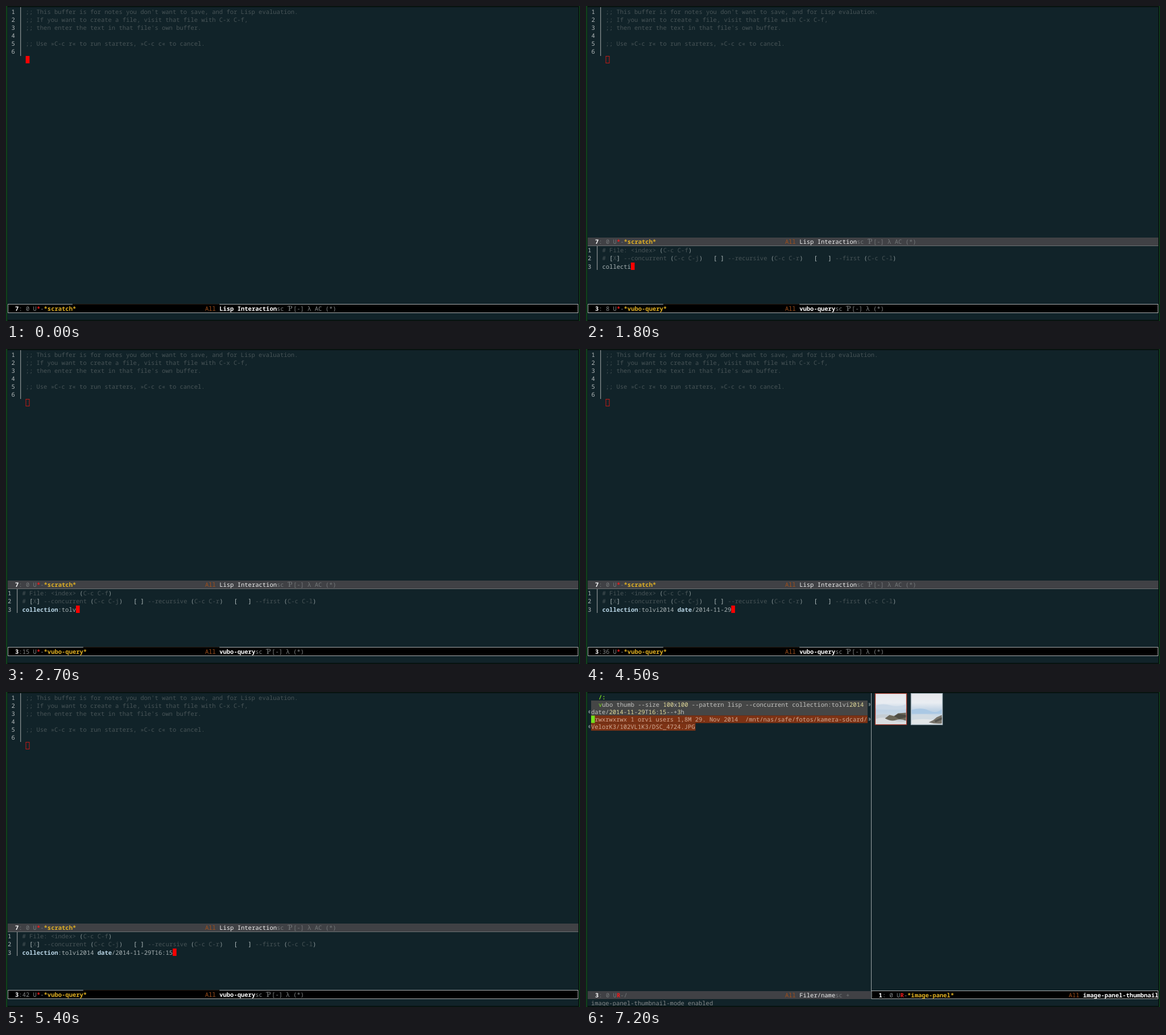
Recreate the animation shown at these times as an HTML page. Size 1009x555 px, loop 8000 ms.

```html
<!DOCTYPE html>
<html lang="en">
<head>
<meta charset="utf-8">
<title>Photo query in a text editor</title>
<style>
  html, body { margin: 0; width: 100%; height: 100%; overflow: hidden; background: #112329; }
  svg { display: block; width: 100vw; height: 100vh; }
  text {
    font: 10.5px "Noto Sans Mono", "DejaVu Sans Mono", monospace;
    white-space: pre; text-rendering: geometricPrecision; fill: #a9b3b5;
  }
  .dim { fill: #485457; }
  .num { fill: #b4babb; }
  .paren { fill: #8b9799; }
  .bracket { fill: #b9c3c4; }
  .grey { fill: #85898a; }
  .soft { fill: #737779; }
  .white { fill: #f0f0f0; }
  .strong { fill: #fff; font-weight: 700; }
  .gold { fill: #e2b122; font-weight: 700; }
  .red { fill: #f01c1c; font-weight: 700; }
  .brown { fill: #a0501c; }
  .key { fill: #b9d6e6; font-weight: 700; }
  .green { fill: #7ee020; font-weight: 700; }
  .lime { fill: #7ee020; }
  .yellow { fill: #e3dc9c; }
  .pale { fill: #c3c3c0; }
  .rust { fill: #d0aa94; }
  .serif { font-family: "Noto Serif", "DejaVu Sans", serif; font-size: 12.5px; }
</style>
</head>
<body>
<svg id="stage" viewBox="0 0 1009 555" preserveAspectRatio="none">
  <defs>
    <linearGradient id="fade">
      <stop offset="0" stop-color="#858789"/>
      <stop offset=".5" stop-color="#62696c"/>
      <stop offset=".85" stop-color="#344147"/>
      <stop offset="1" stop-color="#112329"/>
    </linearGradient>
    <linearGradient id="sky" x2="0" y2="1">
      <stop offset="0" stop-color="#e6e8ec"/>
      <stop offset=".3" stop-color="#e9edf2"/>
      <stop offset=".55" stop-color="#bfd2e4"/>
      <stop offset="1" stop-color="#dce3e8"/>
    </linearGradient>
  </defs>
</svg>
<script>
const LOOP = 8000, STEP = 900, CHAR = 6.3;
const QUERY = "collection:tolvi2014 date/2014-11-29T16:15--+3h";
const TYPED = [0, 0, 8, 15, 26, 36, 42, 47];
const stage = document.getElementById("stage");

function add(parent, tag, attrs = {}) {
  const node = document.createElementNS("http://www.w3.org/2000/svg", tag);
  for (const name in attrs) node.setAttribute(name, attrs[name]);
  parent.append(node);
  return node;
}

const group = () => add(stage, "g");

function rect(parent, x, y, width, height, fill, extra = {}) {
  return add(parent, "rect", { x, y, width, height, fill, ...extra });
}

function setRuns(node, runs) {
  node.replaceChildren();
  for (const [words, style] of runs) {
    add(node, "tspan", style ? { class: style } : {}).textContent = words;
  }
}

// y is the baseline; runs are [words, class] pairs
function text(parent, x, y, ...runs) {
  const node = add(parent, "text", { x, y });
  setRuns(node, runs);
  return node;
}

// Splits a line so that digits get their own class
function digits(words, base) {
  return words.split(/(\d+)/).filter(Boolean)
    .map(part => [part, /\d/.test(part) ? "yellow" : base]);
}

function modeLine(parent, o) {
  const { x, y, width, height, active, base } = o;
  const tone = active ? "grey" : "soft";
  const at = col => x + .5 + col * CHAR;
  if (active) {
    rect(parent, x + .5, y + .5, width - 1, height - 1, "#000", { stroke: "#a9adad" });
  } else {
    rect(parent, x, y, width, height, "#404145");
    rect(parent, x, y + height - 1, width, 1, o.edge || "#404145");
  }
  // The upper border is missing between the name and the mode
  if (o.gap) {
    const start = at(9 + o.name.length);
    rect(parent, start, y, at(59) - start, 1, "#24170f");
  }
  text(parent, at(2), base, [o.line, "strong"]);
  const column = text(parent, at(3), base, [": 0", tone]);
  text(parent, at(7), base, ["U", tone], [o.flag, "red"], ["-", tone], [o.name, o.nameStyle || "gold"]);
  text(parent, at(55), base, ["All", "brown"]);
  text(parent, at(59), base, [o.mode, active ? "strong" : "white"], [o.tail || "", tone]);
  if (o.minor) {
    const start = at(59 + o.mode.length + 3);
    text(parent, start, base, ["Ƥ", tone + " serif"]);
    text(parent, start + 10, base, [o.minor, tone]);
  }
  return column;
}

rect(stage, 0, 0, 1009, 555, "#112329");

// Notes buffer
const notes = group();
const NOTES = [
  ";; This buffer is for notes you don't want to save, and for Lisp evaluation.",
  ";; If you want to create a file, visit that file with C-x C-f,",
  ";; then enter the text in that file's own buffer.",
  "",
  ";; Use »C-c r« to run starters, »C-c c« to cancel.",
  ""
];
NOTES.forEach((line, i) => {
  const y = 13.8 + i * 14.13;
  text(notes, 9.5, y, [String(i + 1), "num"]);
  text(notes, 34.6, y, [line, "dim"]);
});
rect(notes, 25, 2, 1.3, 86, "#858c8e");

const scratch = {
  x: 3, width: 1003, line: "7", flag: "*", name: "*scratch*",
  mode: "Lisp Interaction", tail: "sc", minor: "[-] λ AC (*)"
};
const alone = group();
rect(alone, 34.6, 88, 6.8, 13, "#fb0000");
modeLine(alone, { ...scratch, y: 525, height: 16, base: 536.8, active: true, gap: true });

// Query pane below the notes
const pane = group();
rect(pane, 35, 88.5, 6, 12, "none", { stroke: "#c41a17" });
modeLine(pane, { ...scratch, y: 408, height: 15, base: 418.8, edge: "#6c7072" });
text(pane, 3, 434.3, ["1", "num"]);
text(pane, 3, 448.4, ["2", "num"]);
const thirdLine = text(pane, 3, 462.5, ["3", "num"]);
const gutter = rect(pane, 19, 423, 1.3, 28, "#858c8e");
const binding = keys => [["(", "paren"], [keys, "dim"], [")", "paren"]];
const option = (mark, name, keys) =>
  [["[", "bracket"], [mark, "dim"], ["]", "bracket"], [` --${name} `, "dim"], ...binding(keys)];
text(pane, 28.5, 434.3, ["# File: <index> ", "dim"], ...binding("C-c C-f"));
text(pane, 28.5, 448.4, ["# ", "dim"],
  ...option("X", "concurrent", "C-c C-j"), ["   "],
  ...option(" ", "recursive", "C-c C-r"), ["   "],
  ...option("   ", "first", "C-c C-l"));
const trail = rect(pane, 35, 452, 195, 13, "url(#fade)");
const entry = text(pane, 28.5, 462.5);
const cursor = rect(pane, 28.5, 452, 6.6, 13, "#fb0000");
const column = modeLine(pane, {
  x: 3, y: 525, width: 1003, height: 16, base: 536.8, active: true, gap: true,
  line: "3", flag: "*", name: "*vubo-query*", mode: "vubo-query", tail: "sc", minor: "[-] λ (*)"
});

// File list and thumbnails
const result = group();
rect(result, 9, 15, 486, 26.3, "#454646");
rect(result, 9, 41.3, 486, 13.4, "#7d3214");
rect(result, 9, 54.7, 183.5, 13.4, "#7d3214");
text(result, 22, 12.8, ["/:", "green"]);
text(result, 22, 25.8, ["v", "lime"],
  ...digits("ubo thumb --size 100x100 --pattern lisp --concurrent collection:tolvi2014", "pale"));
text(result, 9, 38.9, ...digits("date/2014-11-29T16:15--+3h", "pale"));
rect(result, 9, 41.6, 6.5, 13, "#74e01c");
text(result, 15.4, 52.1, ["rwxrwxrwx 1 orvi users 1,8M 29. Nov 2014  /mnt/nas/safe/fotos/kamera-sdcard/", "rust"]);
text(result, 9, 65.2, ["VelorK3/102VL1K3/DSC_4724.JPG", "rust"]);

// Small hooks that mark wrapped lines
const hook = (x, y, dir) => add(result, "path", {
  d: `M${x - 1.5 * dir} ${y - 2}h${2 * dir}q${1.5 * dir} 2 0 4h${-2 * dir}m0 -2h${2 * dir}`,
  fill: "none", stroke: "#a3adaf", "stroke-width": .9
});
[[22, 35], [48, 61]].forEach(([end, start]) => {
  hook(498.3, end, 1);
  hook(6, start, -1);
});

function thumb(x, edge, shapes) {
  rect(result, x, 2.5, 55, 55, "url(#sky)", { stroke: edge, "stroke-width": 1.4 });
  for (const [d, fill] of shapes) {
    add(result, "path", { d, fill, transform: `translate(${x} 2.5)` });
  }
}
thumb(508.5, "#a63a2c", [
  ["M1 21Q14 17 27 21T54 19V27Q30 30 1 26Z", "#cbd9e7"],
  ["M1 38Q20 34 54 42V54H1Z", "#c5cdd3"],
  ["M1 45Q14 40 28 46T54 49V54H1Z", "#d9dde0"],
  ["M17 44L25 38 33 40 40 35 54 34V48Q44 44 36 47T17 44Z", "#6b6759"],
  ["M33 40L41 36 54 38V42L42 45Z", "#4c4b43"]
]);
thumb(571.5, "#a9b7c0", [
  ["M1 29Q18 24 31 30T54 28V36H1Z", "#aac8e4"],
  ["M1 39Q22 34 54 42V54H1Z", "#d0dae2"],
  ["M1 47Q20 43 54 48V54H1Z", "#e2e6e8"],
  ["M31 51L39 47 45 42 54 38V53Q42 54 31 51Z", "#77736a"],
  ["M41 48L54 42V46L43 51Z", "#55544e"]
]);

modeLine(result, {
  x: 3, y: 527, width: 498, height: 14, base: 537.8,
  line: "3", flag: "R", name: "/", nameStyle: "soft", mode: "Filer/name", tail: "sc +"
});
modeLine(result, {
  x: 501.5, y: 526, width: 504.5, height: 15, base: 537.8, active: true,
  line: "1", flag: "R", name: "*image-panel*", mode: "image-panel-thumbnail"
});
rect(result, 501, 2, 1, 525, "#9aa2a4");
text(result, 9, 551.5, ["image-panel-thumbnail-mode enabled", "grey"]);

// Window frame: a thin green line with black inside it
const frame = group();
rect(frame, 1.5, 1, 1005.5, 553, "none", { stroke: "#050b0d", "stroke-width": 2 });
rect(frame, 0, 0, 1009, 1, "#0a1a12");
rect(frame, 0, 554, 1009, 1, "#0a1a12");
rect(frame, .8, 0, 1, 555, "#1b7423");
rect(frame, 1007.6, 0, 1, 555, "#145a1c");

const show = (node, on) => node.setAttribute("display", on ? "inline" : "none");

function update(time) {
  const step = Math.floor(time / STEP);
  const last = step === 8;
  const querying = step > 0 && !last;
  const started = querying && step > 1;
  show(notes, !last);
  show(alone, step === 0);
  show(pane, querying);
  show(result, last);
  show(trail, step === 1);
  show(thirdLine, started);
  if (!querying) return;

  const count = TYPED[step];
  const parts = QUERY.slice(0, count).split(/((?:collection|date)(?=[:/]))/).filter(Boolean);
  setRuns(entry, parts.map(p => [p, /^(collection|date)$/.test(p) ? "key" : ""]));
  cursor.setAttribute("x", 28.5 + count * CHAR);
  gutter.setAttribute("height", started ? 42 : 28);
  setRuns(column, [[":" + String(count).padStart(2), "grey"]]);
}

const begin = performance.now();
function tick() {
  update((performance.now() - begin) % LOOP);
  requestAnimationFrame(tick);
}
tick();
</script>
</body>
</html>
```
